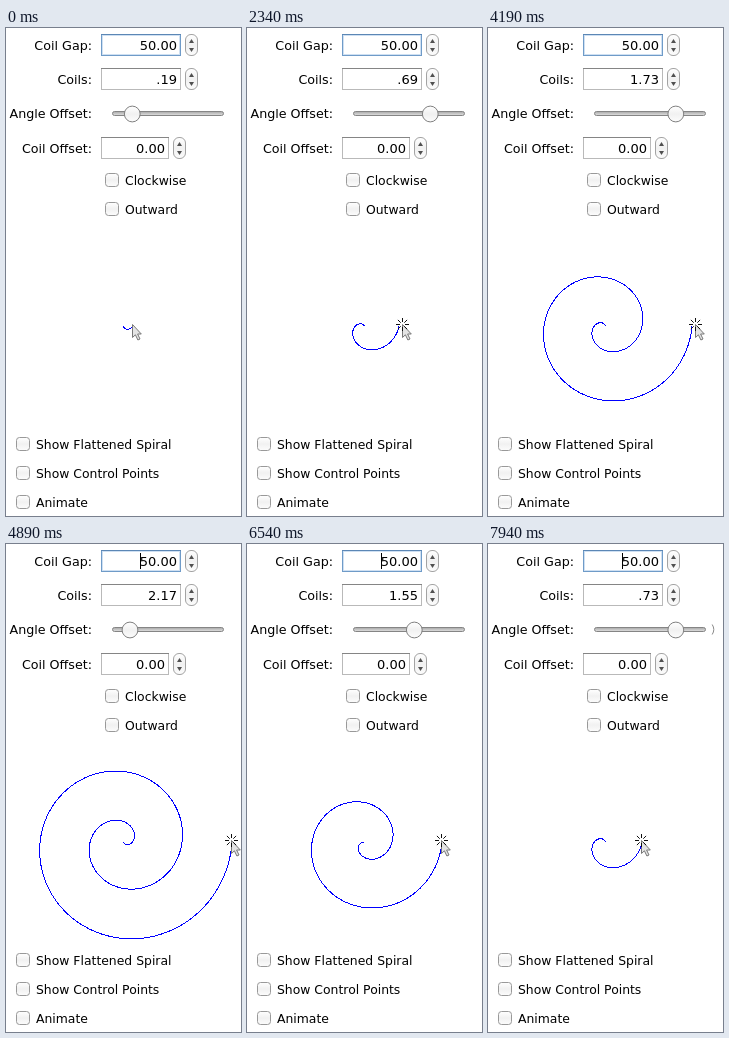
These frames come from a looping animation (235x488 px, 8000 ms). An HTML page:

```html
<!DOCTYPE html>
<html>
<head>
<meta charset="utf-8">
<title>Spiral controls</title>
<style>
html, body { margin: 0; width: 100%; height: 100%; overflow: hidden; background: #fff; }
svg { display: block; width: 235px; height: 488px; }
text { font: 12.4px "DejaVu Sans", sans-serif; fill: #000; }
text.label { font-size: 12.7px; }
text.value { font-size: 13px; }
.label, .value { text-anchor: end; }
</style>
</head>
<body>
<svg id="stage" viewBox="0 0 235 488">
  <defs>
    <linearGradient id="button" x2="0" y2="1">
      <stop offset="0" stop-color="#fff"/>
      <stop offset=".5" stop-color="#f1f1f1"/>
      <stop offset="1" stop-color="#fcfcfc"/>
    </linearGradient>
    <linearGradient id="groove" x2="0" y2="1">
      <stop offset="0" stop-color="#a6a6a6"/>
      <stop offset="1" stop-color="#e2e2e2"/>
    </linearGradient>
  </defs>
  <g id="controls"></g>
  <path id="spiral" fill="none" stroke="#00f" shape-rendering="crispEdges"/>
  <rect x="106.5" y="83.5" width="111" height="4" rx="2" fill="url(#groove)" stroke="#858585"/>
  <path id="sliver" d="M224.2 80.5Q227.4 85.5 224.2 90.5" fill="none" stroke="#8a8a8a"/>
  <circle id="knob" cy="86" r="7.9" fill="url(#button)" stroke="#808080"/>
  <rect id="caret" x="134" y="9" width="1" height="16"/>
  <g id="cursor">
    <path d="M.5 .5V13.5L3.4 10.8L5.9 16L8 15L5.6 10H9.3Z" fill="#e4e4e4" stroke="#777"/>
    <path id="rays" stroke="#111"/>
  </g>
</svg>
<script>
const LOOP = 8000, GAP = 50, CX = 117.5, CY = 298.5;
const $ = id => document.getElementById(id);

// [time, coils]
const KEYS = [
  [1240, .19], [1500, .26], [2090, .57], [2340, .69], [2690, .92], [2790, .92],
  [3640, 1.43], [4190, 1.73], [4490, 1.93], [4890, 2.17], [5290, 2.17],
  [5500, 2.12], [5990, 1.87], [6140, 1.78], [6190, 1.78], [7040, 1.21],
  [7890, .82], [7940, .73]
];
const BLINKS = [100, 700, 1290, 1890, 2490, 3090, 3590, 4140, 4740, 5340, 6140, 6740, 7340];

const field = (y, w, focused) => {
  const edge = focused ? '#6f9bc8' : '#b9b9b9';
  return `<rect x="95.5" y="${y}.5" width="${w}" height="21" fill="#fff" stroke="${edge}"/>` +
    `<path d="M95 ${y}.5h${w + 1}" stroke="${focused ? '#5c87b5' : '#858585'}"/>` +
    (focused ? `<rect x="96.5" y="${y + 1}.5" width="${w - 2}" height="19" fill="none" stroke="#cfe0f2"/>` : '');
};

const spinner = (x, y) =>
  `<rect x="${x}.5" y="${y}.5" width="12" height="21" rx="5.5" fill="url(#button)" stroke="#a3a3a3"/>` +
  `<path d="M${x + 4} ${y + 9}l2.5 -4l2.5 4zM${x + 4} ${y + 14}l2.5 4l2.5 -4z" fill="#505050"/>`;

const label = (y, s) => `<text class="label" x="86" y="${y}">${s}</text>`;

const value = (x, y, s, id = '') => `<text class="value" id="${id}" x="${x}" y="${y}">${s}</text>`;

const checkbox = (x, y, s) =>
  `<rect x="${x}.5" y="${y - 7}.5" width="13" height="13" rx="3" fill="url(#button)" stroke="#999"/>` +
  `<text x="${x + 20}" y="${y + 5}">${s}</text>`;

$('controls').innerHTML = [
  label(22, 'Coil Gap:'), field(6, 79, true), value(171, 22, '50.00', 'gap'), spinner(179, 6),
  label(56, 'Coils:'), field(40, 79), value(171, 56, '', 'coils'), spinner(179, 40),
  label(90, 'Angle Offset:'),
  label(125, 'Coil Offset:'), field(109, 67), value(159, 125, '0.00', 'offset'), spinner(167, 109),
  checkbox(99, 152, 'Clockwise'), checkbox(99, 181, 'Outward'),
  checkbox(10, 416, 'Show Flattened Spiral'),
  checkbox(10, 445, 'Show Control Points'),
  checkbox(10, 474, 'Animate')
].join('');

let rays = '';
for (let i = 0; i < 8; i++) {
  const a = i * Math.PI / 4, x = Math.cos(a), y = Math.sin(a);
  rays += `M${.5 + 2.5 * x} ${.5 + 2.5 * y}L${.5 + 6.5 * x} ${.5 + 6.5 * y}`;
}
$('rays').setAttribute('d', rays);

function coilsAt(t) {
  const i = KEYS.findIndex(k => k[0] > t);
  if (i === 0) return KEYS[0][1];
  if (i < 0) return KEYS[KEYS.length - 1][1];
  const [t0, a] = KEYS[i - 1], [t1, b] = KEYS[i];
  return a + (b - a) * (t - t0) / (t1 - t0);
}

function spiralPath(coils) {
  const steps = Math.ceil(coils * 90);
  let d = '';
  for (let i = 0; i <= steps; i++) {
    const turn = coils * i / steps, a = 2 * Math.PI * (coils - turn), r = GAP * turn;
    d += (i ? 'L' : 'M') + (CX + r * Math.cos(a)).toFixed(2) + ' ' + (CY + r * Math.sin(a)).toFixed(2);
  }
  return d;
}

const show = (id, on) => $(id).setAttribute('visibility', on ? 'visible' : 'hidden');

function draw(time) {
  // Motion advances on a 50 ms grid.
  const t = Math.max(0, Math.floor((time - 40) / 50) * 50 + 40);
  const coils = Math.round(coilsAt(t) * 100) / 100;
  const growing = t > 1240 && coilsAt(t + 50) > coilsAt(t) + .001;

  $('coils').textContent = coils.toFixed(2).replace(/^0/, '');
  $('spiral').setAttribute('d', spiralPath(coils));
  $('knob').setAttribute('cx', 104.6 + 114 * (coils % 1));
  const x = CX + GAP * coils + (growing ? 3 : -1);
  $('cursor').setAttribute('transform', `translate(${Math.floor(x)} 296)`);
  show('rays', t >= 1290);
  show('sliver', t > 7090 && coils < 1);
  show('caret', BLINKS.filter(b => b <= time).length % 2);
}

const start = performance.now();
function frame() {
  draw((performance.now() - start) % LOOP);
  requestAnimationFrame(frame);
}
frame();
</script>
</body>
</html>
```
